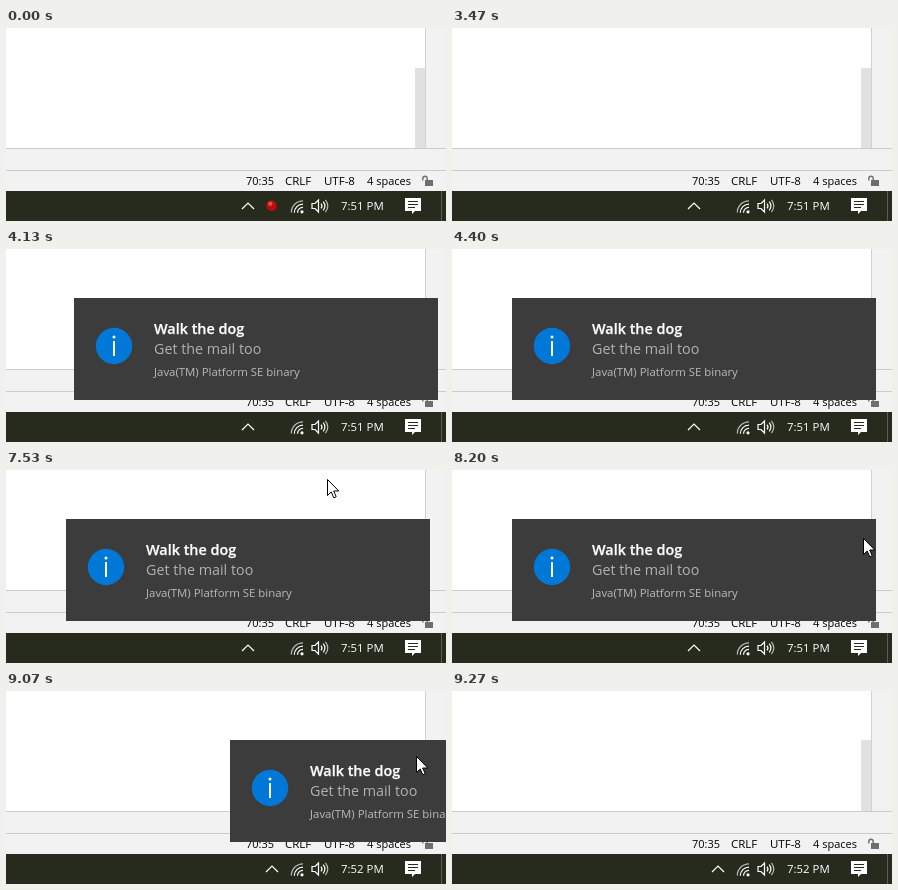
Recreate the animation shown at these times as an HTML page. Size 440 px wide and 193 px high, loop 9.74 s.

```html
<!DOCTYPE html>
<html lang="en">
<head>
<meta charset="utf-8">
<title>Tray reminder</title>
<style>
  html, body { margin: 0; width: 100%; height: 100%; overflow: hidden; background: #fff; }
  svg { display: block; width: 440px; height: 193px; font-family: "Open Sans", "Noto Sans", sans-serif; }
  .line { fill: none; stroke: #fff; stroke-width: 1.2; }
  .dim { stroke: #b9bab6; }
</style>
</head>
<body>
<svg viewBox="0 0 440 193">
  <!-- editor -->
  <rect width="440" height="193" fill="#fff"/>
  <rect id="thumb" x="409" width="10" fill="#e1e1e1"/>
  <rect x="419" width="21" height="120" fill="#f2f2f2"/>
  <rect x="419" width="1" height="120" fill="#d1d1d1"/>
  <rect y="120" width="440" height="43" fill="#f2f2f2"/>
  <path d="M0 120.5H440M0 142.5H440" stroke="#cbcbcb"/>

  <!-- status bar -->
  <g font-size="11">
    <text x="240" y="157">70:35</text>
    <text x="279" y="157" font-size="11.5">CRLF</text>
    <text x="318" y="157" font-size="11.5">UTF-8</text>
    <text x="361" y="157">4 spaces</text>
  </g>
  <rect x="419" y="152" width="8" height="6" fill="#6e6e6e"/>
  <path d="M416.8 152.5V150.5A2.2 2.2 0 0 1 421.2 150.5V152.5" fill="none" stroke="#6e6e6e" stroke-width="1.4"/>

  <!-- taskbar -->
  <rect y="163" width="440" height="30" fill="#272b1e"/>
  <path d="M435.5 163V193" stroke="#5a6048"/>
  <path id="chevron" class="line" d="M-6 181L0 175L6 181"/>
  <g id="badge">
    <circle cx="265.5" cy="177.7" r="5.2" fill="#b80f0c"/>
    <circle cx="264.3" cy="175.8" r="2.2" fill="#ea4a3c"/>
  </g>
  <g class="line">
    <path class="dim" d="M285.3 184.5A11.7 11.7 0 0 1 297 172.8"/>
    <path d="M288.3 184.8A8.7 8.7 0 0 1 297 176.1M291.5 184.8A5.5 5.5 0 0 1 297 179.3"/>
  </g>
  <circle cx="296" cy="183.8" r="1.6" fill="#fff"/>
  <path class="line" d="M306 175.5H309L312.5 172V184L309 180.5H306ZM315 175.6Q317 178 315 180.4M317.2 173.7Q320.6 178 317.2 182.3"/>
  <path class="line dim" d="M319.4 171.8Q324.2 178 319.4 184.2"/>
  <text id="clock" x="335" y="182" fill="#fff" font-size="11.4"></text>
  <path d="M399 170H415V183H409L406 186V183H399Z" fill="#fff"/>
  <path d="M402 173.5H412M402 176.5H412M402 179.5H409" stroke="#272b1e"/>

  <!-- notification -->
  <g id="toast">
    <rect x="60" y="49" width="364" height="102" fill="#3c3c3c"/>
    <circle cx="100" cy="97" r="18.2" fill="#0078d7"/>
    <circle cx="100" cy="88" r="1.5" fill="#fff"/>
    <rect x="99" y="92" width="2" height="15" fill="#fff"/>
    <text x="140" y="85" fill="#fff" font-size="14.4" font-weight="600" stroke="#fff" stroke-width=".25">Walk the dog</text>
    <text x="140" y="105" fill="#b2b2b2" font-size="14.3">Get the mail too</text>
    <text x="140" y="127" fill="#bababa" font-size="11.4">Java(TM) Platform SE binary</text>
  </g>

  <path id="pointer" d="M.5 .5V16.5L4.2 13L6.8 18.8L9.2 17.7L6.7 12H11.8Z" fill="#fff" stroke="#000"/>
</svg>
<script>
const LOOP = 9740;
const STEP = 1000 / 15;
const WIDTH = 380;   // distance that carries the toast off stage
const TOAST_IN = 3870, TOAST_OUT = 8860, TOAST_GONE = 9265;

// Pointer stops: time in ms, x, y.
const stops = [
  [7530, 321, 9], [7800, 273, 88], [8200, 411, 68], [8530, 411, 68],
  [8670, 410, 65], [9130, 410, 65], [9265, 440, 70]
];

const [thumb, chevron, badge, clock, toast, pointer] =
  ['thumb', 'chevron', 'badge', 'clock', 'toast', 'pointer']
    .map(id => document.getElementById(id));

const ease = p => p * p * (3 - 2 * p);

function show(node, on) {
  node.setAttribute('visibility', on ? 'visible' : 'hidden');
}

function move(node, x, y = 0) {
  node.setAttribute('transform', `translate(${Math.round(x)} ${Math.round(y)})`);
}

// Decays in from the right, then accelerates back out.
function toastOffset(t) {
  if (t < TOAST_OUT) return 250 * Math.exp(-(t - TOAST_IN) / 75.5);
  return WIDTH * ((t - TOAST_OUT) / (TOAST_GONE - TOAST_OUT)) ** 1.25;
}

function pointerAt(t) {
  const i = stops.findIndex(stop => stop[0] > t);
  if (i < 1) return null;
  const [t0, x0, y0] = stops[i - 1];
  const [t1, x1, y1] = stops[i];
  const p = ease((t - t0) / (t1 - t0));
  return [x0 + (x1 - x0) * p, y0 + (y1 - y0) * p];
}

function draw(time) {
  const t = Math.floor((time + 5) / STEP) * STEP;

  const top = t < 3590 ? 40 : 49;
  thumb.setAttribute('y', top);
  thumb.setAttribute('height', 120 - top);
  show(badge, t < 3460);
  clock.textContent = t < 8530 ? '7:51 PM' : '7:52 PM';
  move(chevron, t < 8930 ? 242 : 266);

  const toastOn = t > TOAST_IN - 5 && t < TOAST_GONE;
  show(toast, toastOn);
  if (toastOn) move(toast, toastOffset(t));

  const pos = pointerAt(t);
  show(pointer, pos);
  if (pos) move(pointer, ...pos);
}

function tick() {
  draw(performance.now() % LOOP);
  requestAnimationFrame(tick);
}
tick();
</script>
</body>
</html>
```
